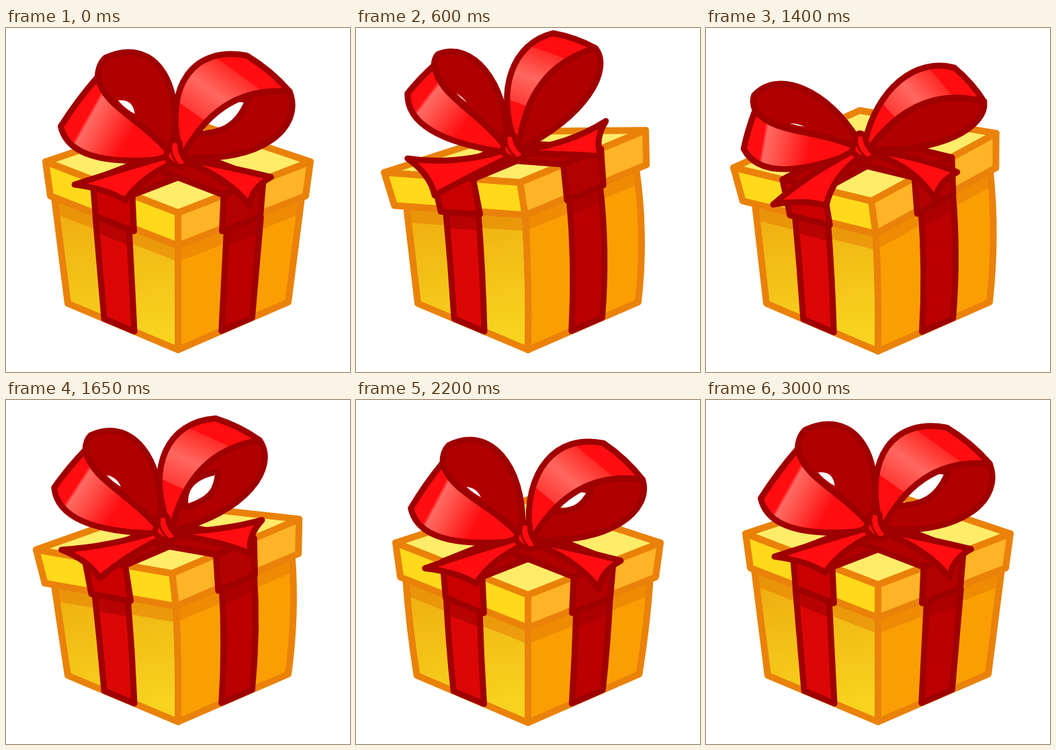
Recreate the animation shown at these times as an HTML page with a canvas. Size 512 by 512 pixels, loop 3050 ms.

```html
<!DOCTYPE html>
<html lang="en">
<head>
<meta charset="utf-8">
<title>Bouncing gift box</title>
<style>
html, body { margin: 0; width: 100%; height: 100%; overflow: hidden; background: #fff; }
canvas { display: block; width: 512px; height: 512px; }
</style>
</head>
<body>
<canvas id="stage" width="512" height="512"></canvas>
<script>
const ctx = document.getElementById('stage').getContext('2d');
const LOOP = 3050, STEP = 50, BOUNCE = 500;
const ORANGE = '#ea820a', MAROON = '#9f0000', RED = '#ff0d10', DARK = '#b00000';

// lid: height of the side corners; drop, back: how far the near and far corners lie from them;
// floor, spread, top: body; knot: offset from the lid; peak, tipL, tipR, sag: angles of the bow;
// puff: fullness of the loops; gap: opening seen through them.
const rest = { tilt: 0, lid: 199, drop: 76, back: 66, floor: 479, spread: 164, top: 184,
  knot: -9, peak: .95, tipL: .25, tipR: .51, sag: .25, puff: .45, gap: 1 };
const high = { ...rest, lid: 182, drop: 47, back: 30, top: 171,
  knot: -4, peak: 1.07, tipL: .65, tipR: .72, sag: -.1, puff: .32, gap: .35 };
const rise = { ...rest, lid: 181, back: 60, floor: 481, spread: 166, top: 175,
  knot: -3, peak: .59, tipL: .13, tipR: .24, sag: .4, puff: .3, gap: .4 };
const squash = { ...rise, lid: 215, drop: 97, back: 79, floor: 484, spread: 171, top: 185,
  knot: -5, peak: .47, tipL: -.03, tipR: .11, sag: .57, gap: 0 };
const deep = { ...squash, lid: 223, drop: 105, back: 85, floor: 487, spread: 173 };

const blend = (a, b, f) =>
  Object.fromEntries(Object.keys(a).map(k => [k, f(a[k], b[k], k)]));
const mix = (a, b, u) => blend(a, b, (x, y) => x + (y - x) * u);

const keys = [[0, rest], [150, squash], [275, deep]];
[-1, 1, -1, 0].forEach((side, i) => {
  const peak = 525 + BOUNCE * i;
  const at = (dt, pose, lean, extra) =>
    keys.push([peak + dt, { ...pose, tilt: lean * side, ...extra }]);
  at(-125, rise, .13);
  at(-50, mix(rise, high, .55), .165, { lid: 172 });
  at(15, high, .178, { lid: 174 });
  at(75, high, .16);
  at(150, mix(high, rest, .7), .09, { lid: 207 });
  at(250, deep, 0);
});
keys.push([2550, squash], [2750, mix(squash, rest, .75)], [2850, rest], [LOOP, rest]);

// Smooth interpolation that never overshoots a key
const slope = (i, k) => i < 0 || i > keys.length - 2 ? 0 :
  (keys[i + 1][1][k] - keys[i][1][k]) / (keys[i + 1][0] - keys[i][0]);
function tangent(i, k) {
  const a = slope(i - 1, k), b = slope(i, k);
  return a * b <= 0 ? 0 : 2 * a * b / (a + b);
}
function sample(t) {
  const i = keys.findIndex(key => key[0] > t) - 1;
  const [t0, a] = keys[i], [t1, b] = keys[i + 1], d = t1 - t0, u = (t - t0) / d;
  const s = u * u * (3 - 2 * u);
  return blend(a, b, (x, y, k) => x + (y - x) * s
    + d * u * (1 - u) * ((1 - u) * tangent(i, k) - u * tangent(i + 1, k)));
}

const lerp = (p, q, u) => [p[0] + (q[0] - p[0]) * u, p[1] + (q[1] - p[1]) * u];
const add = (p, x, y) => [p[0] + x, p[1] + y];
// Point at share u of the way from p to q, raised by share v on the given side
function off(p, q, side, u, v) {
  const dx = q[0] - p[0], dy = q[1] - p[1];
  return [p[0] + u * dx + side * v * dy, p[1] + u * dy - side * v * dx];
}

// Each step after the start is a list of one, two or three points: line, quadratic, cubic.
function trace(start, ...steps) {
  const path = new Path2D();
  path.moveTo(...start);
  for (const s of steps) {
    const c = s.flat();
    if (s.length === 1) path.lineTo(...c);
    else if (s.length === 2) path.quadraticCurveTo(...c);
    else path.bezierCurveTo(...c);
  }
  path.closePath();
  return path;
}
const poly = (p, ...more) => trace(p, ...more.map(q => [q]));
function paint(path, fill, line, width = 9) {
  if (fill) { ctx.fillStyle = fill; ctx.fill(path, 'evenodd'); }
  if (line) { ctx.strokeStyle = line; ctx.lineWidth = width; ctx.stroke(path); }
}
function shade(from, to, stops) {
  const g = ctx.createLinearGradient(...from, ...to);
  stops.forEach(([at, c]) => g.addColorStop(at, c));
  return g;
}

function drawBox({ tilt, lid, drop, back, floor, spread, top }) {
  const pivot = lid + drop + 75, sin = Math.sin(tilt), cos = Math.cos(tilt);
  const turn = (x, y) =>
    [256 + x * cos - (y - pivot) * sin, pivot + x * sin + (y - pivot) * cos];
  const L = turn(-197, lid), F = turn(0, lid + drop), R = turn(197, lid), B = turn(0, lid - back);
  const L2 = turn(-190, lid + 51), F2 = turn(0, lid + drop + 49), R2 = turn(190, lid + 51);

  // Upright edges of the body: top, control, bottom
  const edge = (p, q, bend) => [p, add(lerp(p, q, .5), bend, 0), q];
  const under = (x, p) => lerp(p, F2, (x - p[0]) / (F2[0] - p[0]));
  const fat = Math.max(0, lid - 200) * .25, shift = 62 * tilt;
  const left = edge(under(256 - top + shift, L2), [256 - spread, 410], -fat - 80 * Math.max(0, tilt));
  const front = edge(F2, [256, floor], -25 * tilt);
  const right = edge(under(256 + top + shift, R2), [256 + spread, 408], fat + 80 * Math.max(0, -tilt));
  const between = (a, b, u) => a.map((p, i) => lerp(p, b[i], u));
  const panel = (a, b) => trace(a[0], [a[1], a[2]], [b[2]], [b[1], b[0]]);

  function face(shape, corner, fill, shadow, depth, line, width) {
    paint(shape, fill);
    ctx.save();
    ctx.clip(shape);
    paint(poly(corner, F2, add(F2, 0, depth), add(corner, 0, depth)), shadow);
    ctx.restore();
    paint(shape, null, line, width);
  }
  const yellow = shade([150, 270], [185, 460], [[0, '#f0af11'], [1, '#f7d31f']]);
  const tint = 'rgba(226,118,0,.48)';
  face(panel(left, front), L2, yellow, tint, 24, ORANGE, 10);
  face(panel(front, right), R2, '#fb9e03', tint, 24, ORANGE, 10);
  face(panel(between(left, front, .33), between(left, front, .604)),
    L2, '#dc0607', 'rgba(150,0,0,.5)', 28, MAROON);
  face(panel(between(front, right, .395), between(front, right, .673)),
    R2, '#ba0000', 'rgba(150,0,0,.4)', 28, MAROON);

  paint(poly(L, F, R, B), '#ffec68', ORANGE, 10);
  paint(poly(L, F, F2, L2), '#ffd91a', ORANGE, 10);
  paint(poly(F, R, R2, F2), '#ffb326', ORANGE, 10);

  // Ribbon over one side of the lid, then across its top
  function strap(side, side2, away, color) {
    const [a, b] = [.345, .645].map(u => lerp(F, side, u));
    const [a2, b2] = [.345, .645].map(u => add(lerp(F2, side2, u), 0, 4));
    const dx = (away[0] - F[0]) / 2, dy = (away[1] - F[1]) / 2;
    paint(poly(a, b, add(b, dx, dy), add(a, dx, dy)), DARK, MAROON);
    paint(poly(a, b, b2, a2), color, MAROON);
  }
  strap(L, L2, R, '#ca0000');
  strap(R, R2, L, '#b30000');
  return turn;
}

function drawBow({ peak, tipL, tipR, sag, puff, gap }) {
  const polar = (side, r, angle) => [side * r * Math.cos(angle), -r * Math.sin(angle)];
  const arc = (p, q, side, u1, v1, u2, v2) => [off(p, q, side, u1, v1), off(p, q, side, u2, v2)];

  // Right loop
  const kr = [10, 2], topR = polar(1, 183, peak), endR = polar(1, 195, tipR);
  const [r1, r2] = arc([6, -10], topR, 1, .37, puff * .95, .8, puff * .95);
  const [i1, i2] = arc(kr, endR, 1, .39, .24, .72, .21);
  const [o1, o2] = arc(kr, endR, 1, .52, -puff * .85, .95, -puff * .65);
  const inR = trace(endR, [o2, o1, kr], [i1, i2, endR]);
  if (gap > .5) {
    const z = (u, v) => off([68, -50], endR, 1, u * gap, v * gap);
    inR.addPath(trace(z(-.5, .05), [z(-.25, .42), z(.1, .35), z(.45, .12)],
      [z(.2, -.1), z(0, -.2), z(-.5, .05)]));
  }
  paint(inR, DARK, MAROON);
  const rim = off(topR, endR, 1, .5, .08);
  paint(trace([6, -10], [r1, r2, topR], [rim, endR], [i2, i1, kr]),
    shade([0, 0], topR, [[0, RED], [.37, RED], [.37, '#ff3a36'],
      [.6, '#ff685f'], [.84, '#ff2a26'], [.84, RED], [1, RED]]), MAROON);

  // Left loop
  const kl = [-8, -4], kb = [-8, 4], topL = polar(-1, 179, peak), endL = polar(-1, 176, tipL);
  const fold = add(lerp(topL, endL, .25), 5, 3);
  const [l1, l2] = arc([-4, -14], topL, -1, .42, puff, .9, puff);
  const [s1, s2] = arc(kl, fold, -1, .46, .02, .75, -.15);
  const [b1, b2] = arc(kb, endL, -1, .48, -.2, .86, -.25);
  paint(trace([-4, -14], [l1, l2, topL], [off(topL, fold, -1, .4, .2), fold], [s2, s1, kl]),
    DARK, MAROON);
  if (gap > .05) {
    const mid = [0, 1].map(n => (fold[n] + 3 * s2[n] + 3 * s1[n] + kl[n]) / 8);
    const run = [0, 1].map(n => kl[n] + s1[n] - s2[n] - fold[n]);
    const w = 8 + 8 * gap;
    ctx.save();
    ctx.translate(mid[0] + 3, mid[1] - 8);
    ctx.rotate(Math.atan2(run[1], run[0]));
    paint(trace([-w, 0], [[0, -16 * gap * gap], [w, 0]], [[0, 3 * gap], [-w, 0]]), '#fff');
    ctx.restore();
  }
  paint(trace(fold, [off(fold, endL, -1, .5, .04), endL], [b2, b1, kb], [kl], [s1, s2, fold]),
    shade(lerp(fold, endL, .5), [0, 0], [[0, RED], [.13, RED], [.16, '#ff6a63'],
      [.25, '#ff5850'], [.55, RED], [1, RED]]), MAROON);

  // Tails: outer corner p, inner corner q
  function tail(side, from, to, p, q) {
    const hollow = lerp(lerp(p, q, .5), [0, 0], .1);
    paint(trace(from, [off(from, p, side, .53, .35 * (sag - .22)), p], [hollow, q],
      [off(to, q, side, .56, .05 + .35 * sag), to]), RED, MAROON);
  }
  const flare = 100 + 100 * Math.max(0, .24 - sag);
  tail(-1, [-9, 0], [-2, 10], polar(-1, 156, -sag - .03), polar(-1, flare, -sag - .48));
  tail(1, [13, 4], [16, 9], polar(1, 146, .03 - sag), polar(1, 133, -sag - .34));

  // Knot
  paint(trace([-8, -20], [[0, -27], [7, -19]], [[6, -3], [19, 11]], [[9, 21], [-3, 13]],
    [[-17, 5], [-13, -4]], [[-7, -10], [-8, -20]]), RED, MAROON, 8);
  paint(trace([-6, -8], [[-5, 3], [3, 11]], [[-5, 3], [-6, -8]]), null, MAROON, 3);
}

function draw(now) {
  const pose = sample(Math.floor(now % LOOP / STEP) * STEP);
  ctx.clearRect(0, 0, 512, 512);
  ctx.lineJoin = ctx.lineCap = 'round';
  const turn = drawBox(pose);
  ctx.save();
  ctx.translate(...turn(-4, pose.lid + pose.knot));
  ctx.rotate(pose.tilt);
  drawBow(pose);
  ctx.restore();
}

const start = performance.now();
function tick() {
  draw(performance.now() - start);
  requestAnimationFrame(tick);
}
tick();
</script>
</body>
</html>
```
